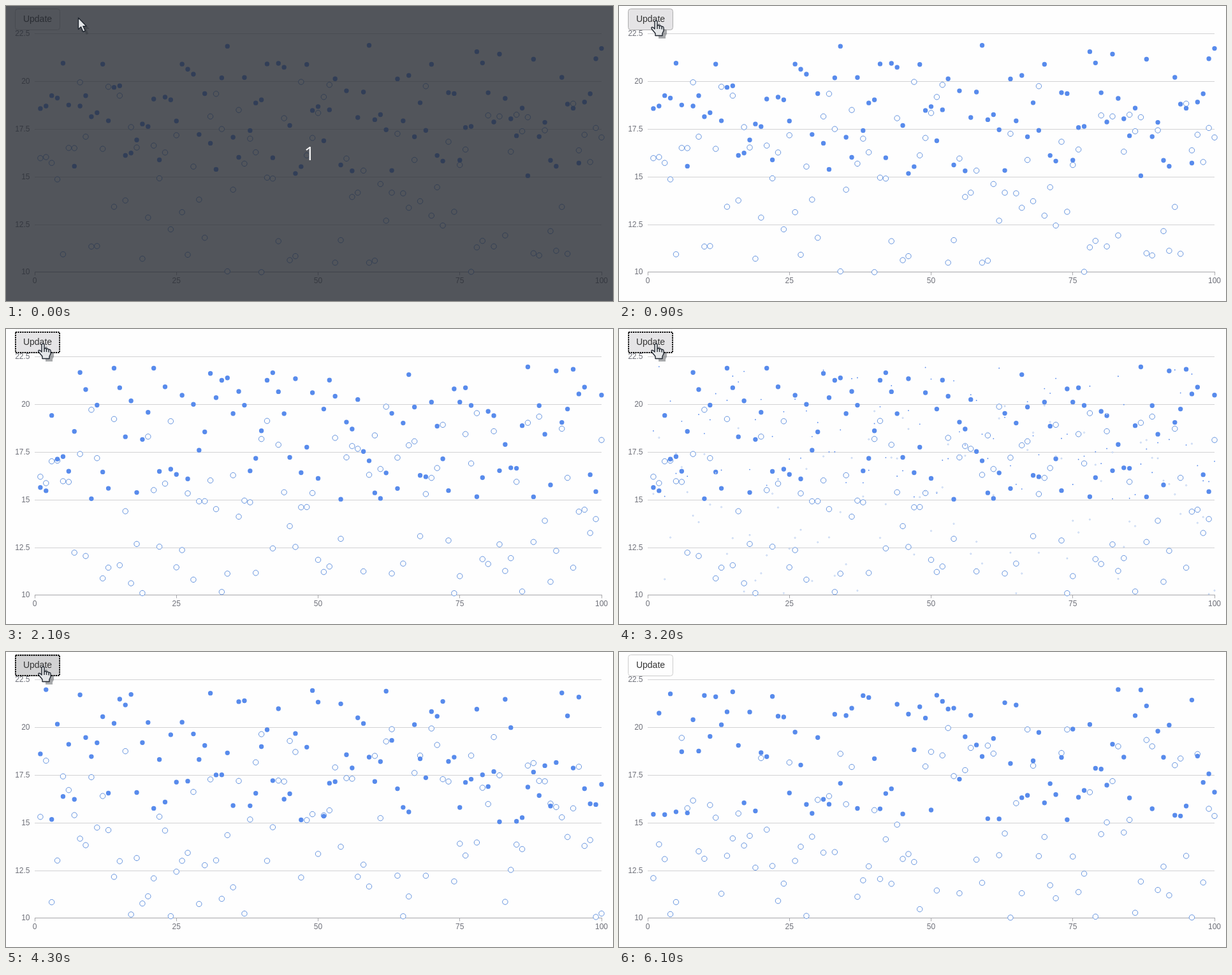
Write an HTML page that moves like this. It is 952 by 463 pixels and loops after 6.3 s.

```html
<!DOCTYPE html>
<html lang="en">
<head>
<meta charset="utf-8">
<title>Scatter update</title>
<style>
  html, body { margin: 0; width: 100%; height: 100%; overflow: hidden; background: #fefefe; }
  svg { display: block; width: 952px; height: 463px; font-family: "Liberation Sans", Arial, sans-serif; }
  .axis text { font-size: 12px; fill: #6e7079; }
  .axis line { stroke: #d2d2d4; }
  .axis .base { stroke: #a6a6aa; }
  .hollow { fill: #fefefe; stroke: #6594df; }
  .solid { fill: #588bec; }
  .cursor { stroke: #222831; stroke-width: 1.4; stroke-linejoin: round; fill: #e4e6e8; }
  .shadow { fill: #30343a; opacity: .42; stroke: none; }
</style>
</head>
<body>
<svg viewBox="0 0 952 463">
  <rect width="952" height="463" fill="#fefefe"/>
  <g class="axis" id="axis"></g>
  <g id="dots"></g>
  <rect id="button" x="14.5" y="4.5" width="70" height="33" rx="4"/>
  <path id="inset" d="M16 8V6H83V8" fill="none" stroke="#000" stroke-opacity=".1" stroke-width="2"/>
  <rect id="focus" x="15" y="5" width="69" height="32" fill="none" stroke="#000" stroke-width="2" stroke-dasharray="2 1.5"/>
  <text x="49.5" y="25" text-anchor="middle" font-size="14" fill="#333">Update</text>
  <g id="overlay">
    <rect width="952" height="463" fill="#272b32" fill-opacity=".8"/>
    <text x="476" y="242" text-anchor="middle" font-size="30" fill="#f4f4f4" font-family="Open Sans, sans-serif">1</text>
  </g>
  <g id="cursor"></g>
</svg>
<script>
const LOOP = 6300;
const COUNT = 100;
const $ = id => document.getElementById(id);

function add(parent, tag, attrs, text) {
  const el = document.createElementNS("http://www.w3.org/2000/svg", tag);
  for (const key in attrs) el.setAttribute(key, attrs[key]);
  if (text !== undefined) el.textContent = text;
  parent.append(el);
  return el;
}

// Scales and axes
const xOf = value => 45 + value * 8.89;
const yOf = value => 418 - (value - 10) * 29.96;

for (let v = 10; v <= 22.5; v += 2.5) {
  const y = Math.floor(yOf(v)) + (v === 10 ? -.5 : .5);
  add($("axis"), "line", { x1: 45, x2: 934, y1: y, y2: y, class: v === 10 ? "base" : "" });
  add($("axis"), "text", { x: 37.5, y: y + 3.7, "text-anchor": "end" }, v);
}
for (let v = 0; v <= 100; v += 25) {
  const x = Math.floor(xOf(v)) + .5;
  add($("axis"), "line", { x1: x, x2: x, y1: 417, y2: 422.5, class: "base" });
  add($("axis"), "text", { x: xOf(v), y: 435, "text-anchor": "middle" }, v);
}

// Data: two uniform random series per update
function random(seed) {
  return () => {
    seed = (seed + 0x6D2B79F5) | 0;
    let n = Math.imul(seed ^ (seed >>> 15), 1 | seed);
    n = (n + Math.imul(n ^ (n >>> 7), 61 | n)) ^ n;
    return ((n ^ (n >>> 14)) >>> 0) / 4294967296;
  };
}
function series(rand, low, span) {
  return Array.from({ length: COUNT }, (_, i) => [xOf(i + 1), yOf(low + span * rand())]);
}
const sets = [11, 23, 37, 53].map(seed => {
  const rand = random(seed);
  return { solid: series(rand, 15, 7), hollow: series(rand, 10, 10) };
});

const circles = (points, r) => points.map(([x, y]) =>
  `M${(x - r).toFixed(2)} ${y.toFixed(2)}a${r} ${r} 0 1 0 ${2 * r} 0a${r} ${r} 0 1 0 ${-2 * r} 0`).join("");

const layers = sets.map(set => ({
  set,
  hollow: add($("dots"), "path", { class: "hollow" }),
  solid: add($("dots"), "path", { class: "solid" })
}));

function drawSet({ set, hollow, solid }, scale) {
  hollow.setAttribute("d", scale ? circles(set.hollow, 4.2 * scale) : "");
  hollow.setAttribute("stroke-width", Math.max(.4, scale));
  solid.setAttribute("d", scale ? circles(set.solid, 3.7 * scale) : "");
}

// Each update: start time, growth of the new set per 100 ms
const updates = [
  [1800, [.25, .82, .97, 1]],
  [3200, [.25, .85, 1]],
  [4700, [.25, .82, .97, 1]]
];
const shrink = [1, .3, 0];

function scaleAt(index, t) {
  const step = (start, values) => values[Math.min(values.length - 1, (t - start) / 100)];
  const enter = updates[index - 1], leave = updates[index];
  if (enter && t < enter[0]) return 0;
  if (leave && t >= leave[0]) return step(leave[0], shrink);
  return enter ? step(...enter) : 1;
}

// Pointers, with the hot spot at the origin
const shapes = {
  arrow: "M.5 .5V18.5L4.6 14.8L8 22.5L11.2 21L7.9 13.6H13Z",
  hand: "M-2 12V2Q-2 0 0 0T2 2V8Q4 6.5 5.5 8.5Q8 7.2 9 9.4Q12 8.6 12 11.5V16L10 20V23.5H-1V20L-6 14Q-8 11-6.5 10.3Q-4.5 10-2 13Z"
};
const pointers = {};
for (const name in shapes) {
  const g = pointers[name] = add($("cursor"), "g", {});
  add(g, "path", { d: shapes[name], class: "shadow", transform: "translate(5 4.5)" });
  add(g, "path", { d: shapes[name], class: "cursor" });
}
add(pointers.hand, "path", { d: "M2 8V13M5.5 9V13M9 10V13.5", class: "cursor", "stroke-width": 1 });

const pointerSteps = [
  [0, "arrow", 113, 18],
  [500, "arrow", 105, 19],
  [600, "arrow", 93, 21],
  [700, "hand", 78, 22],
  [800, "hand", 65, 23],
  [900, "hand", 58, 23],
  [5300, "hand", 55, 24],
  [5500, "", 0, 0]
];
const buttonSteps = [
  [0, "rest"], [700, "hover"],
  [1400, "down"], [1500, "hover"],
  [2700, "down"], [2900, "hover"],
  [4300, "down"], [4500, "hover"],
  [5500, "fade"], [5600, "rest"]
];
const buttonColors = {
  rest: ["#fefefe", "#cccccc"],
  hover: ["#e5e4e6", "#adadad"],
  fade: ["#f2f2f3", "#bdbdbd"],
  down: ["#d2d2d3", "#8c8c8c"]
};

const at = (steps, t) => steps.findLast(step => step[0] <= t);
const show = (el, on) => el.setAttribute("visibility", on ? "visible" : "hidden");

function draw(t) {
  layers.forEach((layer, i) => {
    const scale = scaleAt(i, t);
    if (layer.scale !== scale) drawSet(layer, layer.scale = scale);
  });

  const [, state] = at(buttonSteps, t);
  const [fill, stroke] = buttonColors[state];
  $("button").setAttribute("fill", fill);
  $("button").setAttribute("stroke", stroke);
  show($("inset"), state === "down");
  show($("focus"), t >= 1400 && t < 6100);

  const [, shape, x, y] = at(pointerSteps, t);
  for (const name in pointers) show(pointers[name], name === shape);
  $("cursor").setAttribute("transform", `translate(${x} ${y})`);
  show($("overlay"), t < 100);
}

const start = performance.now();
let last = -1;
function tick() {
  const elapsed = Math.max(0, performance.now() - start) % LOOP;
  const t = Math.floor(elapsed / 100) * 100;
  if (t !== last) draw(last = t);
  requestAnimationFrame(tick);
}
tick();
</script>
</body>
</html>
```
